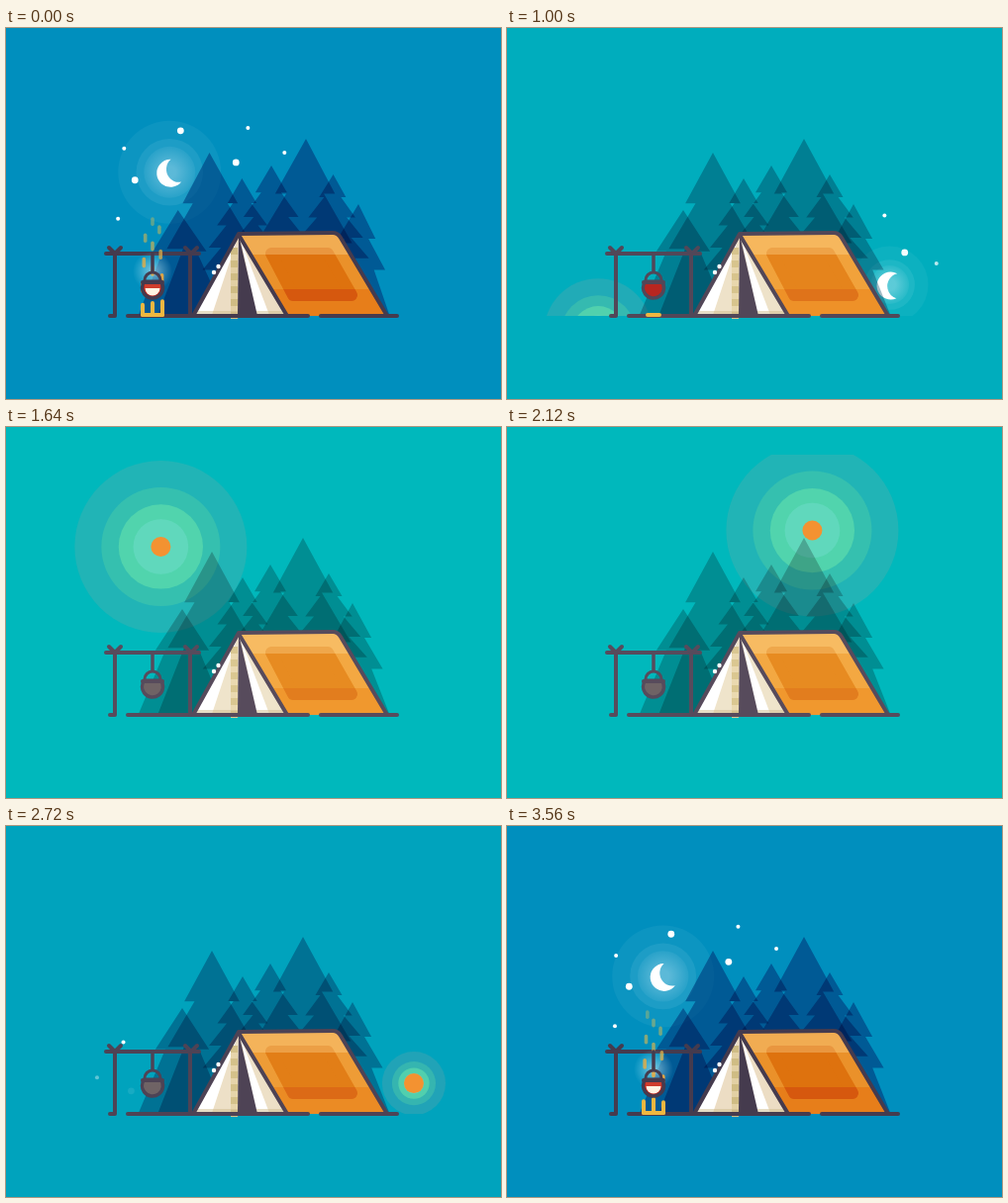
These frames come from a looping animation (500x375 px, 3.6 s). An HTML page with a canvas:

```html
<!DOCTYPE html>
<html lang="en">
<head>
<meta charset="utf-8">
<title>Camp day and night</title>
<style>
html, body { margin: 0; width: 100%; height: 100%; overflow: hidden; background: #008fbe; }
canvas { display: block; width: 500px; height: 375px; }
</style>
</head>
<body>
<canvas id="stage" width="500" height="375"></canvas>
<script>
const c = document.getElementById('stage').getContext('2d');
const LOOP = 3600, GROUND = 291, CX = 248, CY = 257, RAD = Math.PI / 180;

const clamp = v => Math.max(0, Math.min(1, v));
const ramp = (t, a, b) => clamp((t - a) / (b - a));
const mix = (a, b, k) => 'rgb(' + a.map((v, i) => Math.round(v + (b[i] - v) * k)) + ')';

function trace(points) {
  c.beginPath();
  points.forEach(p => c.lineTo(...p));
}

function poly(points, fill) {
  trace(points);
  c.closePath();
  c.fillStyle = fill;
  c.fill();
}

function line(points, color, width = 4) {
  trace(points);
  c.strokeStyle = color;
  c.lineWidth = width;
  c.stroke();
}

function disc(x, y, r, fill) {
  c.beginPath();
  c.arc(x, y, r, 0, 7);
  c.fillStyle = fill;
  c.fill();
}

function rect(x, y, w, h, fill) {
  c.fillStyle = fill;
  c.fillRect(x, y, w, h);
}

function clipped(path, paint) {
  c.save();
  path();
  c.clip();
  paint();
  c.restore();
}

// the first three stars are the bright ones
const STARS = [[176, 104], [232, 136], [130, 154], [119, 122], [244, 101], [281, 126], [113, 193]];

function drawNight(t) {
  const s = t > LOOP / 2 ? t - LOOP : t;
  const turn = s * (s < 0 ? .0996 : .1277) * RAD;
  const cos = Math.cos(turn), sin = Math.sin(turn);
  const spin = (x, y) => [
    CX + (x - CX) * cos - (y - CY) * sin,
    CY + (x - CX) * sin + (y - CY) * cos
  ];
  STARS.forEach((star, i) => {
    const [x, y] = spin(...star);
    disc(x, y, i < 3 ? 3.4 : 2, `rgba(255,255,255,${ramp(y, 272, 225)})`);
  });

  const [mx, my] = spin(165, 146);
  const halo = 52 - .013 * Math.abs(s);
  disc(mx, my, halo, 'rgba(225,245,255,.05)');
  disc(mx, my, halo * .65, 'rgba(225,245,255,.08)');
  const glow = c.createRadialGradient(mx, my, 6, mx, my, halo * .5);
  glow.addColorStop(0, 'rgba(225,245,255,.32)');
  glow.addColorStop(1, 'rgba(225,245,255,.06)');
  disc(mx, my, halo * .5, glow);

  // crescent: a disc of radius r with a disc of radius b, shifted by d, taken out
  const r = 14, b = 13, d = 9.6;
  const dir = Math.min(2, .045 * s - 25) * RAD;
  const chord = (d * d + r * r - b * b) / (2 * d);
  const tip = Math.acos(chord / r), bite = Math.acos((chord - d) / b);
  c.beginPath();
  c.arc(mx + 1, my + 1, r, dir + tip, dir - tip + 2 * Math.PI);
  c.arc(mx + 1 + d * Math.cos(dir), my + 1 + d * Math.sin(dir), b, dir - bite, dir + bite, true);
  c.fillStyle = '#fff';
  c.fill();
}

function drawSun(t) {
  const r = Math.min(87, .071 * (t - 230), .14 * (2950 - t));
  if (t < 500 || r <= 0) return;
  const a = (.1158 * (t - 1000) - 198.2) * RAD;
  const x = CX + 164 * Math.cos(a), y = CY + 164 * Math.sin(a);
  disc(x, y, r, 'rgba(150,165,160,.22)');
  disc(x, y, r * .69, 'rgba(95,215,160,.33)');
  disc(x, y, r * .49, 'rgba(100,225,172,.6)');
  disc(x, y, r * .32, 'rgba(110,220,200,.55)');
  disc(x, y, 10, '#f39231');
}

// apex, tier step as a share of the height, spread
const TREES = [
  [208, 126, .31], [300, 112, .31], [267, 139, .18], [239, 152, .18],
  [326, 148, .16], [350, 178, .31], [178, 184, .39, 1.25]
];

function drawTree([x, y, step, spread = 1], gust, tint) {
  const h = GROUND - y;
  const side = [[0, 0]];
  const width = k => .64 * k * (1 - .48 * k) * h * spread;
  for (let n = 1, k = step; k < .7; k = step * (.1 + .9 * ++n)) {
    side.push([width(k), k], [width(k) * .63, k]);
  }
  side.push([width(1), 1]);
  const lean = (x - 250) * .06 * gust;
  const place = dir => ([w, k]) => [x + dir * w + lean * (1 - k), y + k * h];
  poly([...side.map(place(1)), ...side.map(place(-1)).reverse()], tint);
}

function drawTrees(t, day) {
  const tint = mix([75, 161, 200], [195, 197, 199], day);
  c.globalCompositeOperation = 'multiply';
  for (const tree of TREES) drawTree(tree, 1 - ramp(t, 0, 1000), tint);
  c.globalCompositeOperation = 'source-over';
}

function drawTent(day, ink) {
  poly([[235, 208], [189, 291], [284, 291]], mix([236, 221, 196], [239, 228, 203], day));
  poly([[234, 212], [191, 290], [208, 290]], '#fff');
  const tan = mix([207, 188, 132], [218, 199, 145], day);
  rect(227, 226, 7, 64, mix([226, 208, 164], [234, 217, 176], day));
  for (let y = 222; y < 288; y += 13) rect(227, y, 7, 7, tan);
  poly([[237, 214], [253, 290], [266, 290]], '#fff');
  rect(192, 286, 88, 4, 'rgba(207,188,140,.5)');
  poly([[235, 209], [234, 291], [254, 291]], ink);

  const roof = [[235, 208], [332, 208], [337, 211], [385, 291], [284, 291]];
  clipped(() => trace(roof), () => {
    const panel = [[268, 228], [325, 228], [349, 270], [290, 270], [268, 228], [325, 228]];
    const band = (top, bottom, base, inner) => clipped(
      () => { c.beginPath(); c.rect(230, top, 160, bottom - top); },
      () => {
        rect(230, top, 160, bottom - top, base);
        poly(panel, inner);
        line(panel, inner, 12);
      });
    band(205, 264, mix([234, 145, 42], [243, 168, 66], day), mix([222, 114, 14], [231, 139, 33], day));
    band(264, 292, mix([231, 126, 26], [240, 152, 46], day), mix([214, 88, 14], [226, 125, 30], day));
    rect(230, 205, 160, 24, 'rgba(255,226,165,.32)');
  });

  line([[235, 209], [284, 291]], ink);
  c.beginPath();
  c.moveTo(189, 291);
  c.lineTo(235, 208);
  c.lineTo(330, 207);
  c.quadraticCurveTo(335, 207, 338, 212);
  c.lineTo(385, 291);
  c.stroke();
  disc(210, 247, 2.2, '#fff');
  disc(214.5, 241, 2.2, '#fff');
  line([[123, GROUND], [305, GROUND]], ink);
  line([[318, GROUND], [395, GROUND]], ink);
}

function drawRack(ink) {
  line([[105, GROUND], [110, GROUND], [110, 228]], ink);
  line([[186, GROUND], [186, 228]], ink);
  line([[101, 228], [195, 228]], ink);
  for (const x of [110, 187]) line([[x - 6, 222], [x, 228], [x + 6, 222]], ink);
}

function drawPot(heat, glow, ink) {
  line([[148, 228], [148, 246]], ink, 3.5);
  c.beginPath();
  c.arc(148, 255, 8, Math.PI, 0);
  c.lineWidth = 3;
  c.stroke();
  c.beginPath();
  c.arc(148, 262.5, 10.5, -.65, Math.PI + .65);
  c.closePath();
  c.fillStyle = mix([111, 99, 101], [184, 38, 32], heat);
  c.fill();
  c.lineWidth = 3.5;
  c.stroke();
  line([[138, 257], [158, 257]], ink);
  c.globalAlpha = glow;
  rect(140, 259, 16, 4, '#cf3d2c');
  c.beginPath();
  c.arc(148, 263, 7.5, 0, Math.PI);
  c.fillStyle = '#fff3e2';
  c.fill();
  c.globalAlpha = 1;
}

function drawFire(t, glow, bed) {
  const flame = '#efb740';
  if (bed > 0) line([[148 - 10 * bed, 290], [148 + 10 * bed, 290]], flame);
  if (glow <= 0) return;

  const steam = c.createRadialGradient(148, 246, 2, 148, 246, 20);
  steam.addColorStop(0, `rgba(190,225,240,${.6 * glow})`);
  steam.addColorStop(1, 'rgba(150,222,242,0)');
  disc(148, 246, 20, steam);

  for (let col = -1; col < 2; col++) {
    const x = 148 + col * 10;
    line([[x, 290], [x, 290 - (12 + 2 * Math.sin(t / 90 + col * 2)) * glow]], flame);
  }
  // sparks climb in three columns that draw closer together
  for (let i = 0; i < 9; i++) {
    const p = (t / 900 + i / 9) % 1;
    const x = 148 + (i * 2 % 3 - 1) * 10 * (1 - .4 * p);
    const y = 266 - 76 * p;
    c.globalAlpha = glow * (1 - .65 * p);
    line([[x, y], [x, y - 8 + 3 * p]], mix([240, 165, 60], [215, 195, 85], p), 3.6);
  }
  c.globalAlpha = 1;
}

function draw(t) {
  const day = ramp(t, 480, 1200) - ramp(t, 2380, 3060);
  const heat = 1 - ramp(t, 1000, 1350) + ramp(t, 2950, 3200);
  const glow = 1 - ramp(t, 700, 960) + ramp(t, 3080, 3320);
  const bed = 1 - ramp(t, 800, 1300) + ramp(t, 2960, 3160);
  const ink = mix([69, 59, 78], [87, 75, 92], day);

  rect(0, 0, 500, 375, mix([0, 143, 190], [0, 184, 188], day));
  c.lineCap = c.lineJoin = 'round';
  clipped(() => { c.beginPath(); c.rect(0, 28, 500, GROUND - 28); }, () => {
    drawNight(t);
    drawSun(t);
    drawTrees(t, day);
  });
  drawTent(day, ink);
  drawRack(ink);
  drawFire(t, glow, bed);
  drawPot(heat, glow, ink);
}

const start = performance.now();
function tick() {
  draw((performance.now() - start) % LOOP);
  requestAnimationFrame(tick);
}
tick();
</script>
</body>
</html>
```
